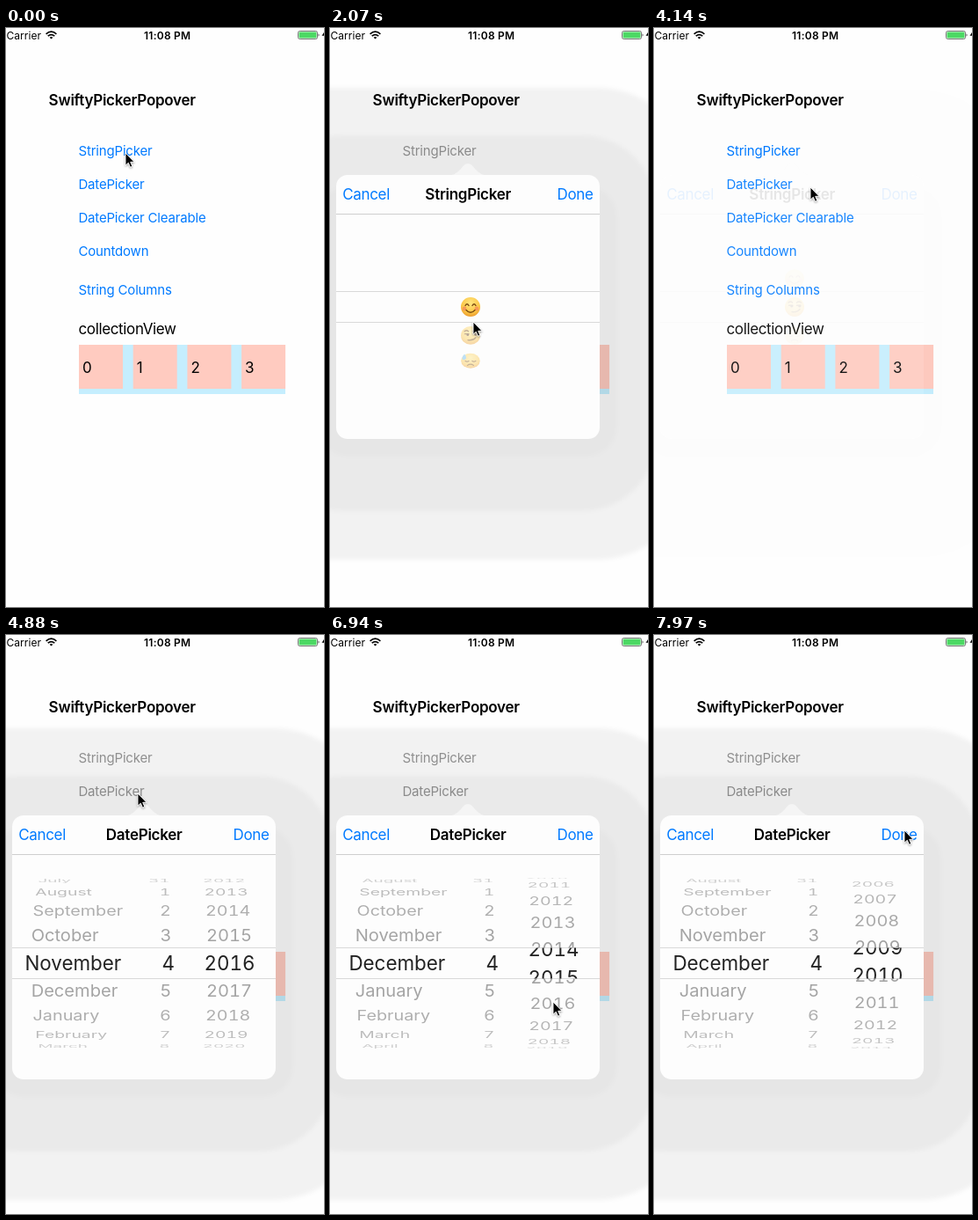
These frames come from a looping animation (362x658 px, 8 s). An HTML page:

```html
<!DOCTYPE html>
<html lang="en">
<head>
<meta charset="utf-8">
<title>Picker popovers</title>
<style>
  html, body { margin: 0; width: 100%; height: 100%; overflow: hidden; background: #fefefe; }
  svg { display: block; width: 362px; height: 658px; }
  text { font-family: Inter, Roboto, sans-serif; font-size: 17px; letter-spacing: -.36px; white-space: pre; }
  .bold { font-weight: 600; letter-spacing: -.26px; }
  .status { font-size: 12px; letter-spacing: .05px; }
  .status.bold { letter-spacing: .25px; }
  .link { font-size: 15px; letter-spacing: -.17px; fill: #007aff; }
  .action { fill: #007aff; letter-spacing: -.35px; }
  .row { font-size: 20.2px; letter-spacing: 0; fill: #9c9c9c; font-variant-numeric: tabular-nums; }
  .band .row { font-size: 22.4px; fill: #222; }
  .line { stroke: #d9d9d9; }
</style>
</head>
<body>
<svg viewBox="0 0 362 658">
  <defs>
    <radialGradient id="skin" cx=".5" cy=".3" r=".75">
      <stop offset="0" stop-color="#ffe680"/><stop offset=".65" stop-color="#fbc544"/><stop offset="1" stop-color="#e8932a"/>
    </radialGradient>
    <filter id="soft" x="-10%" y="-10%" width="120%" height="120%"><feGaussianBlur stdDeviation="2.5"/></filter>
    <filter id="drop" x="-50%" y="-50%" width="200%" height="200%">
      <feDropShadow dx="0" dy="1" stdDeviation="1" flood-opacity=".4"/>
    </filter>
    <clipPath id="inBand"><rect x="-180" y="-17.5" width="542" height="35"/></clipPath>
    <clipPath id="offBand"><path d="M0-97H362V-17.5H0ZM0 17.5H362V97H0Z"/></clipPath>

    <g id="smile" fill="none" stroke="#7a4a12" stroke-width="1.4" stroke-linecap="round">
      <circle r="11" fill="url(#skin)" stroke="none"/>
      <g fill="#f58a5b" stroke="none" opacity=".75"><circle cx="-7" cy="2" r="2.4"/><circle cx="7" cy="2" r="2.4"/></g>
      <path d="M-6-1.5Q-4-5-2-1.5M2-1.5Q4-5 6-1.5M-5 3.5Q0 9 5 3.5"/>
    </g>
    <g id="smirk" fill="none" stroke="#7a4a12" stroke-width="1.4" stroke-linecap="round">
      <circle r="11" fill="url(#skin)" stroke="none"/>
      <path d="M-7-5Q-4.5-7-2.5-5M2.5-5Q5-7 7.5-5M-6.5-1.8H-2M2.5-1.8H7M-3 5.5Q3 6.5 6 2.5"/>
      <g fill="#5a3510" stroke="none"><circle cx="-3.2" cy="-.8" r="1.4"/><circle cx="5.8" cy="-.8" r="1.4"/></g>
    </g>
    <g id="sweat" fill="none" stroke="#7a4a12" stroke-width="1.4" stroke-linecap="round">
      <circle r="11" fill="url(#skin)" stroke="none"/>
      <path d="M-6 0Q-4 2-2 0M2 0Q4 2 6 0M-3.5 6.5Q0 3.5 3.5 6.5"/>
      <path d="M-7-10Q-11-4-9-2Q-6-1-5-4Q-5-7-7-10Z" fill="#63b9ee" stroke="none"/>
    </g>
  </defs>

  <rect width="362" height="658" fill="#fefefe"/>

  <text class="status" x=".5" y="13">Carrier</text>
  <g fill="none" stroke="#000" stroke-width="1.7">
    <path d="M45.6 6.8Q51.5 1.6 57.4 6.8M47.7 9.2Q51.5 5.9 55.3 9.2"/>
    <path d="M51.5 12.6L49.6 10.7Q51.5 9.2 53.4 10.7Z" fill="#000" stroke="none"/>
  </g>
  <text class="status bold" x="183.7" y="13" text-anchor="middle">11:08 PM</text>
  <rect x="332.5" y="3.5" width="22" height="9" rx="2" fill="none" stroke="#555" stroke-width=".8"/>
  <rect x="333.5" y="4.5" width="20" height="7" rx="1" fill="#4cd964"/>
  <path d="M355.7 6.3Q357.3 8 355.7 9.7Z"/>
  <path d="M362 5L359.5 8.8H362Z"/>

  <text class="bold" x="48.6" y="88">SwiftyPickerPopover</text>
  <g id="links">
    <text class="link" x="82.5" y="145">StringPicker</text>
    <text class="link" x="82.4" y="183">DatePicker</text>
    <text class="link" x="82.4" y="221">DatePicker Clearable</text>
    <text class="link" x="82.4" y="259">Countdown</text>
    <text class="link" x="82.5" y="303">String Columns</text>
  </g>
  <text x="82.5" y="348">collectionView</text>
  <rect x="83" y="360" width="235" height="56" fill="#c5eefe"/>
  <g id="cells"></g>
  <g id="popovers"></g>
  <path id="cursor" d="M0 0V14.2L3.3 11.2 5.5 16.2 7.8 15.2 5.7 10.3H10Z" stroke="#fff" stroke-width=".9" filter="url(#drop)"/>
</svg>

<script>
const NS = 'http://www.w3.org/2000/svg';
const LOOP = 8000, TICK = 147.5;
const CENTER_X = 157, ROW_ANGLE = 18.9 * Math.PI / 180;
const MONTHS = ['January', 'February', 'March', 'April', 'May', 'June', 'July',
  'August', 'September', 'October', 'November', 'December'];
const FACES = ['smile', 'smirk', 'sweat'];
const byId = id => document.getElementById(id);

function add(parent, tag, attrs = {}, text = '') {
  const el = document.createElementNS(NS, tag);
  for (const key in attrs) el.setAttribute(key, attrs[key]);
  el.textContent = text;
  return parent.appendChild(el);
}

// Linear interpolation over keys of the form [tick, value, ...]
function at(keys, tick) {
  const next = keys.findIndex(key => key[0] > tick);
  if (next < 0) return keys[keys.length - 1].slice(1);
  if (next === 0) return keys[0].slice(1);
  const a = keys[next - 1], b = keys[next];
  const p = (tick - a[0]) / (b[0] - a[0]);
  return a.slice(1).map((v, i) => v + (b[i + 1] - v) * p);
}

for (let i = 0; i < 4; i++) {
  const x = 83 + i * 61.7;
  add(byId('cells'), 'rect', { x, y: 360, width: 50, height: 50, fill: '#ffcbc0' });
  add(byId('cells'), 'text', { x: x + 4, y: 392 }, i);
}

function makePopover(title, dy, wheelY) {
  const root = add(byId('popovers'), 'g', { transform: `translate(0 ${dy})` });
  const shade = add(root, 'g', { filter: 'url(#soft)' });
  const band = (x, y, width, height, rx, opacity) =>
    add(shade, 'rect', { x, y, width, height, rx, opacity });
  band(-130, 68, 544, 536, 110, .048);
  band(-70, 122, 442, 427, 85, .032);
  band(-15, 180, 342, 307, 35, .014);
  add(root, 'path', { d: 'M134 168Q143 167 149 160Q157 148 165 160Q171 167 180 168Z', fill: '#f5f5f5' });
  add(root, 'rect', { x: 7, y: 167, width: 300, height: 300, rx: 13, fill: '#fdfdfd' });
  add(root, 'path', { d: 'M7 211.5H307', stroke: '#cfcfcf' });
  add(root, 'text', { class: 'action', x: 14.3, y: 195 }, 'Cancel');
  add(root, 'text', { class: 'bold', x: 157.2, y: 195, 'text-anchor': 'middle' }, title);
  const done = add(root, 'text', { class: 'action', x: 299.6, y: 195, 'text-anchor': 'end' }, 'Done');
  const wheels = add(root, 'g', { transform: `translate(0 ${wheelY})` });
  add(wheels, 'path', { class: 'line', d: 'M7-17.5H307M7 17.5H307' });
  return { root, done, wheels };
}

// A cylinder of rows: dimmed outside the selection band, enlarged inside it.
function makeWheel(parent, { radius, make, fill, dimmed }) {
  const layers = [false, true].map(inBand => {
    const group = add(parent, 'g', {
      class: inBand ? 'band' : '',
      'clip-path': `url(#${inBand ? 'inBand' : 'offBand'})`
    });
    const reach = inBand ? 1 : 5;
    const rows = Array.from({ length: reach * 2 + 1 }, (_, i) => ({ step: i - reach, el: make(group, inBand) }));
    return { inBand, rows };
  });
  return value => {
    const base = Math.round(value);
    for (const { inBand, rows } of layers) for (const { step, el } of rows) {
      const angle = (base + step - value) * ROW_ANGLE;
      const cos = Math.cos(angle);
      const shown = cos > .08 && fill(el, base + step);
      el.setAttribute('visibility', shown ? 'inherit' : 'hidden');
      const scale = 1 / (1 + .095 * (1 - cos));
      el.setAttribute('transform',
        `translate(${CENTER_X} ${radius * Math.sin(angle)}) scale(${scale} ${scale * cos})`);
      if (!inBand) el.setAttribute('opacity', dimmed(cos));
    }
  };
}

function textWheel(parent, x, bandX, anchor, label) {
  return makeWheel(parent, {
    radius: 97,
    make: (group, inBand) => add(group, 'text', {
      class: 'row', 'text-anchor': anchor,
      x: (inBand ? bandX : x) - CENTER_X, y: inBand ? 8.1 : 7.3
    }),
    fill: (el, index) => { el.textContent = label(index); return true; },
    dimmed: cos => .3 + .65 * cos
  });
}

const strings = makePopover('StringPicker', 0, 317);
const dates = makePopover('DatePicker', 38, 335);

const turnFaces = makeWheel(strings.wheels, {
  radius: 100,
  make: group => add(group, 'use', { x: 3, y: 0, href: '#smile' }),
  fill: (el, index) => {
    if (!FACES[index]) return false;
    el.setAttribute('href', '#' + FACES[index]);
    return true;
  },
  dimmed: () => .42
});
const turnMonth = textWheel(dates.wheels, 28, 21.4, 'start', i => MONTHS[(i + 12) % 12]);
const turnDay = textWheel(dates.wheels, 188.5, 192, 'end', i => (i + 30) % 31 + 1);
const turnYear = textWheel(dates.wheels, 254.6, 254.6, 'middle', i => i);

const tracks = {
  cursor: [[4, 136, 142], [5, 135, 139], [10, 135, 139], [14, 163, 334], [15, 163, 334],
    [18, 165, 300], [21, 245, 222], [23, 278, 188], [26, 278, 188], [27, 262, 187],
    [28, 178, 181], [29, 150, 180], [33, 150, 180], [34, 100, 425], [35, 100, 425],
    [39, 101, 388], [42, 103, 388], [43, 103, 388], [44, 180, 380], [45, 252, 370],
    [47, 254, 417], [48, 256, 438], [49, 290, 350], [50, 314, 260], [51, 300, 218],
    [52, 286, 223], [54, 285, 222]],
  strings: [[6, 0], [7, .5], [8, 1], [26, 1], [27, .6], [28, .09], [29, 0]],
  dates: [[30, 0], [31, .5], [32, 1]],
  face: [[15, 0], [18, .85], [20, 1]],
  month: [[35, 10], [39, 10.9], [41, 11]],
  year: [[44, 2016], [45, 2015.8], [47, 2014.5], [48, 2013.2], [49, 2012], [50, 2011.1],
    [51, 2010.4], [52, 2010], [53, 2009.75], [54, 2009.57]]
};

const BLUE = [0, 122, 255], GRAY = 150;

function draw(ms) {
  const tick = Math.floor(ms % LOOP / TICK);
  const value = name => at(tracks[name], tick)[0];
  const fades = { strings: value('strings'), dates: value('dates') };

  for (const [popover, fade] of [[strings, fades.strings], [dates, fades.dates]]) {
    popover.root.setAttribute('opacity', fade);
    popover.root.setAttribute('visibility', fade ? 'visible' : 'hidden');
  }
  strings.done.setAttribute('opacity', tick === 25 || tick === 26 ? .35 : 1);

  const dim = Math.max(0, Math.max(fades.strings, fades.dates) * 1.2 - .2);
  const tint = `rgb(${BLUE.map(c => Math.round(c + (GRAY - c) * dim))})`;
  for (const link of byId('links').children) link.style.fill = tint;

  turnFaces(value('face'));
  turnMonth(value('month'));
  turnDay(4);
  turnYear(value('year'));
  byId('cursor').setAttribute('transform', `translate(${at(tracks.cursor, tick)})`);
}

const start = performance.now();
function frame() {
  draw(performance.now() - start);
  requestAnimationFrame(frame);
}
frame();
</script>
</body>
</html>
```
